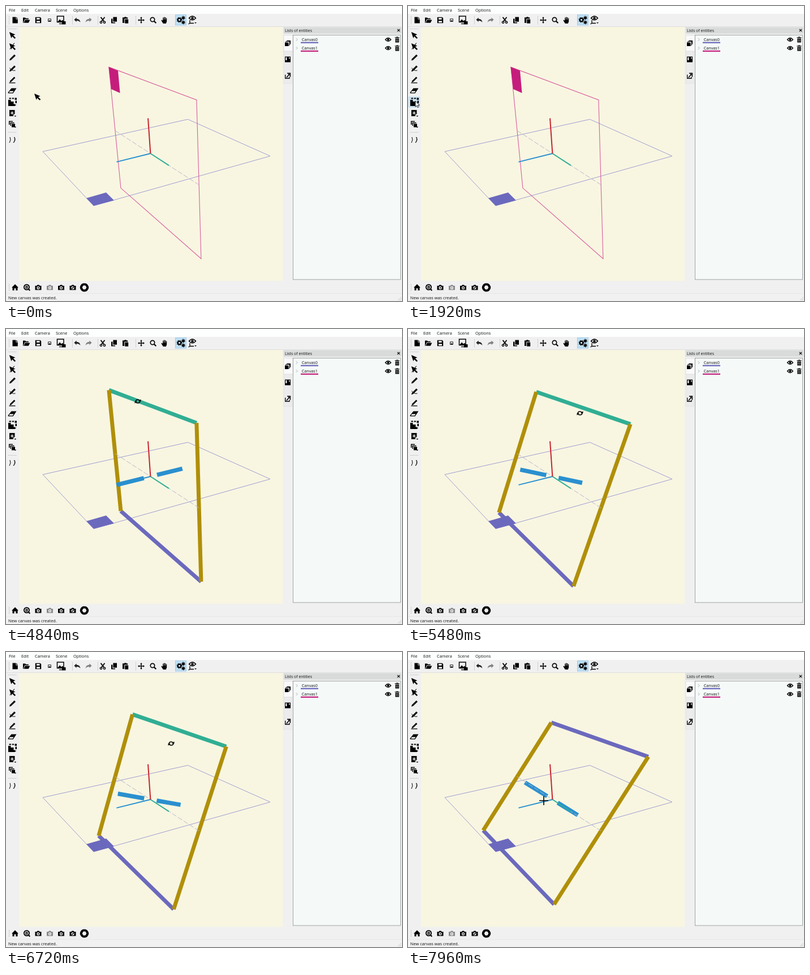
Write an HTML page that moves like this. It is 700 px wide and 522 px high and loops after 8000 ms.

```html
<!DOCTYPE html>
<html lang="en">
<head>
<meta charset="utf-8">
<title>Canvas rotation</title>
<style>
  html, body { margin: 0; width: 100%; height: 100%; overflow: hidden; background: #f0f0f0; }
  svg { display: block; width: 700px; height: 522px; }
  text { font: 7.4px "Open Sans", "Noto Sans", sans-serif; fill: #111; }
  .line { fill: none; stroke: #000; stroke-width: 1.3; }
</style>
</head>
<body>
<svg id="stage" viewBox="0 0 700 522" xmlns="http://www.w3.org/2000/svg">
  <g id="ui"></g>
  <g id="scene"></g>
  <g id="pointer"></g>
</svg>
<script>
const LOOP = 8000;
const C = { purple: '#6b69bd', pink: '#c51d7c', gold: '#b08f08', teal: '#30ae94', blue: '#2a90cf', paper: '#f8f6e1' };
const $ = id => document.getElementById(id);
const rect = (x, y, w, h, fill, more = '') => `<rect x="${x}" y="${y}" width="${w}" height="${h}" fill="${fill}" ${more}/>`;
const text = (x, y, s, size = 7.4) => `<text x="${x}" y="${y}" style="font-size:${size}px">${s}</text>`;
const fill = (d, c = '#000') => `<path d="${d}" fill="${c}" fill-rule="evenodd"/>`;
const line = (d, w = 1.3, c = '#000') => `<path class="line" d="${d}" style="stroke:${c};stroke-width:${w}"/>`;
const at = (x, y, s) => `<g transform="translate(${x} ${y})">${s}</g>`;
const ring = (r, w, c) => `<circle r="${r}" fill="none" stroke="${c || '#000'}" stroke-width="${w}"/>`;
const dot = (x, y, r, c = '#000') => `<circle cx="${x}" cy="${y}" r="${r}" fill="${c}"/>`;

// ---- icons, centred on 0,0 ----
const arrow = fill('M0 0L10.6 4.4 7 6.1 11.3 10.3 9.5 12 5.2 7.8 3.6 11Z');
const pen = fill('M-5.5 5.5L-4.6 2.6 3.3-5.3 5.5-3.1-2.6 4.8Z');
const eye = line('M-5 0Q0-6 5 0Q0 6-5 0Z', 1.3) + dot(0, 0, 2);
const bin = fill('M-4-4.2H-1.5V-5H1.5V-4.2H4V-3H-4ZM-3.3-2H3.3V5H-3.3ZM-1.8-.8V3.8H-1V-.8ZM1-.8V3.8H1.8V-.8Z');
const camera = c => fill('M-5.5-3H-2.6L-1.6-4.6H1.6L2.6-3H5.5V4.5H-5.5Z', c) + dot(0, .7, 2.6, '#f0f0f0');
const more = fill('M3.4 4.6H7.4L5.4 6.6Z');
const undo = c => fill('M-5.6-.8L-1.4-4.6V-2.2Q4.5-2.4 5.5 4Q3 .8-1.4 1V3.2Z', c);
const stack = fill('M-1.5-5H5V1.5H3.5V-3.5H-1.5ZM-5-1.5H1.5V5H-5Z') + line('M-3.2-1.5V-3.3H3.3V3.2H1.5', 1);
const gear = (r, n) => ring(r, 2) +
  `<circle r="${r + 1.4}" fill="none" stroke="#000" stroke-width="1.6" stroke-dasharray="${(r + 1.4) * Math.PI / n}"/>`;
const frame = line('M-6-6H6V6H-6Z', 1.2);
const aperture = () => {
  let s = '';
  for (let a = 0; a < 360; a += 60) s += `<path d="M-2.4-3.4L1.8-7.6Q6.4-6.2 7.2-1.6L1.4-3.4Z" transform="rotate(${a})"/>`;
  return s;
};

function drawUi() {
  let s = rect(0, 0, 700, 522, '#f0f0f0') + rect(0, 0, 700, 14, '#fdfefe');
  [['File', 5], ['Edit', 27], ['Camera', 51], ['Scene', 88], ['Options', 119]].forEach(([n, x]) => s += text(x, 9.8, n));
  s += rect(0, 36, 700, .7, '#d8d8d8') + rect(23, 37, 466, 449.5, C.paper);
  const grip = (x, y, n, dx, dy) => {
    for (let i = 0; i < n; i++) s += rect(x + i * dx, y + i * dy, 1, 1, '#aaa');
  };
  [5, 117, 162, 229, 299].forEach(x => grip(x, 18, 7, 0, 2.2));
  grip(4, 40, 7, 2.2, 0);
  grip(4, 223, 7, 2.2, 0);
  grip(5, 492, 6, 0, 2.2);

  s += rect(299.5, 15.5, 19, 18.5, '#bfdff3', 'stroke="#8fc4e8" stroke-width=".7"');
  const put = (x, y, ...parts) => s += at(x, y, parts.join(''));
  // top row
  put(16, 25, fill('M-4.5-5.5H1.5V-1.5H4.8V5.5H-4.5ZM2.3-5.5L4.8-2.6H2.3Z'));
  put(36, 25, fill('M-6-4.5H-2L-1-3.2H3.8V-1.5H-3L-5 3.4V4.8H-6ZM-2.4-.6H6.4L3.8 4.8H-4.6Z'));
  put(57, 25, fill('M-5.2-5.2H3.5L5.2-3.5V5.2H-5.2ZM-3-4V-1H2.6V-4ZM-3 1.2V4.2H3V1.2Z'));
  put(77, 25, line('M-2.4-2.2H2.4V2.4H-2.4Z', .9), fill('M-2 2L0 0 2.2 2Z'));
  put(97, 24.5, line('M-6.5-6.5H5V4H-6.5Z', 1.5), fill('M-6 4L-2-1 1 2 3 0 5 3V4Z'), fill('M2 2.5H8.5V8H2Z'), line('M-3 7H3', 1.3));
  put(126, 25, undo('#222'));
  put(146, 25, `<g transform="scale(-1 1)">${undo('#808080')}</g>`);
  put(171, 25, line('M-3.5-5.2L2.3 2.4M3.5-5.2L-2.3 2.4', 1.8), `<g transform="translate(-3 3.8)">${ring(1.7, 1.4)}</g><g transform="translate(3 3.8)">${ring(1.7, 1.4)}</g>`);
  put(191, 25, fill('M-1.6-5.5H5V2.7H-1.6ZM-5-2.6H-2.6V3.9H2V5.6H-5Z'));
  put(211, 25, fill('M-5-4.8H-2L-1.2-5.8H1.2L2-4.8H4.2V-2.4H-1.7V5H-5ZM-.7-1.4H5.2V5.8H-.7Z'));
  put(239, 25, line('M-4.5 0H4.5M0-4.5V4.5', 1.4), fill('M-6 0L-3.6-1.9V1.9ZM6 0L3.6-1.9V1.9ZM0-6L-1.9-3.6H1.9ZM0 6L-1.9 3.6H1.9Z'));
  put(259, 24, ring(3.7, 1.7), line('M2.7 2.7L6.3 6.3', 2.2));
  put(280, 25, fill('M-2.2 6L-5.6.6-4.6-.4-2.8 1V-4.4H-1.5V-1H-.9V-5.6H.4V-1H1V-5H2.3V-.7H2.9V-3.6H4.2V2.4L2.8 6Z'));
  put(306.5, 24.5, gear(2.7, 8));
  put(313.4, 21, gear(1.2, 6));
  put(313.4, 29, gear(1.2, 6));
  put(329.5, 22, line('M-6-.5Q0-7.5 6-.5Q0 6-6-.5Z', 1.4), dot(0, -.5, 2.2), line('M-4.5 3V8.5H2.5M-4.5 8.5L-7 10', 1.3), fill('M3.5 7H7.5L5.5 9Z'));
  // left column
  put(5.8, 46, arrow);
  put(5.8, 66, arrow, line('M1 10.5L9-.5', 1.1));
  put(11.5, 91, pen);
  put(11.5, 110.5, pen, line('M-5-1Q-1 5 5 3.5', 1));
  put(11.5, 130, `<g transform="scale(.9)">${pen}</g>`, line('M-6 6H5', 1.3));
  put(11, 150, fill('M-7.5 3L-1.5-4.5H7.5L1.5 4.5H-7ZM-6 3.2H.8L2.6.6H-4Z'));
  s += '<rect id="hover" x="1.5" y="161" width="19" height="18" fill="#cfe6f5" stroke="#9acaea" stroke-width=".6"/>';
  put(11, 170, fill('M-7-4H-2.5V-1H2.5V3.5H5V7H-7Z'), fill('M-5.5-7.5H-2V-5.5H-5.5ZM-.3-7.5H3V-5.5H-.3ZM4.5-7.5H8V-4H4.5ZM5.5-2.5H8V2H5.5Z'), more);
  put(11, 189.5, fill('M-5-5.5H4.5V2H2V5.5H-5ZM-1-3V-.8H-3V.6H-1V2.6H.5V.6H2.5V-.8H.5V-3Z'), more);
  put(11, 209, fill('M-6-5.5H1V-4H-4.5V1H-6ZM-3.5-3H3.5V-1.5H-2V3H-3.5ZM-1-.5H5V5.5H-1Z'), more);
  put(11, 237, line('M-5 5Q-1.5 0-4-5M2 5Q6 0 3.5-5', 1), line('M2.5 5Q7 0 4-5', .7));
  // bottom row
  put(16, 498, fill('M0-5.8L6 .2H4.5V5.2H1.4V1.4H-1.4V5.2H-4.5V.2H-6Z'));
  put(36.5, 497.5, ring(4.6, 1.8), line('M3.2 3.2L5.8 6', 2), dot(0, 0, 2.5), line('M-2 0H2', .8, '#fff'));
  put(57, 498, camera('#000'), fill('M-1.6.7L1-.9V2.3Z'));
  put(77.5, 498, camera('#8a8a8a'), fill('M1.6.7L-1-.9V2.3Z', '#8a8a8a'));
  put(97.5, 498, camera('#000'), dot(0, .7, 1.2));
  put(118, 498, camera('#000'), line('M-1.5 2.3L1.7-1', 1.5));
  put(138.5, 498, aperture());
  s += rect(0, 509, 700, 13, '#f1f1f1') + rect(0, 508.6, 700, .6, '#dedede') + text(4, 518.6, 'New canvas was created.');
  for (let i = 0; i < 3; i++) for (let j = 0; j <= i; j++) s += rect(693 + i * 2.2, 519.5 - j * 2.2, 1, 1, '#b0b0b0');

  // entity panel
  s += rect(490.5, 37.5, 208.5, 11.5, '#d9dbdb') + text(493, 46, 'Lists of entities', 6.9);
  s += at(694, 43, line('M-2.2-2.2L2.2 2.2M2.2-2.2L-2.2 2.2', 1.1));
  s += rect(491, 52, 16, 28, '#fafafa', 'stroke="#ccc" stroke-width=".5"') + rect(491, 80, 14, 57, '#ececec', 'stroke="#d6d6d6" stroke-width=".5"');
  s += rect(507.4, 51.4, 190, 432.6, '#f5faf9', 'stroke="#8b8f8f" stroke-width=".8"');
  put(498, 66, stack);
  put(498, 94.5, fill('M-5-5H5V5H-5ZM-3.8-3.8V1.5H-1.5V-3.8ZM2.2-3.8V-1H3.8V-3.8Z'));
  put(498, 123.5, line('M-4.3-2V4.5H3V2M-1-4.5H4.5V2', 1.3), fill('M-3 3L1.6-2.6 0-3.4H3.5V.5L2.5-1.2-1 3Z'));
  [[59.5, 'Canvas0', C.purple], [74.5, 'Canvas1', C.pink]].forEach(([y, name, c]) => {
    s += at(514, y, line('M-1.2-2.4L1.2 0-1.2 2.4', .8, '#999'));
    s += text(522.8, y + 2.7, name, 7.2) + rect(521, y + 4.2, 31, 2.2, c);
    put(675.5, y, eye);
    put(691.5, y, bin);
  });
  $('ui').innerHTML = s;
}

// ---- motion: monotone cubic through [time, value...] keys ----
function track(keys, t, col = 1) {
  const n = keys.length - 1;
  if (t <= keys[0][0]) return keys[0][col];
  if (t >= keys[n][0]) return keys[n][col];
  const i = keys.findIndex(k => k[0] > t) - 1;
  const slope = j => (keys[j + 1][col] - keys[j][col]) / (keys[j + 1][0] - keys[j][0]);
  const tangent = j => {
    if (j < 1 || j >= n) return 0;
    const a = slope(j - 1), b = slope(j);
    return a * b > 0 ? 2 * a * b / (a + b) : 0;
  };
  const h = keys[i + 1][0] - keys[i][0], u = (t - keys[i][0]) / h, v = 1 - u;
  return keys[i][col] * v * v * (1 + 2 * u) + keys[i + 1][col] * u * u * (3 - 2 * u)
    + h * u * v * (tangent(i) * v - tangent(i + 1) * u);
}
const PATH = [
  [120, 50, 155], [900, 35, 159], [1760, 13, 168], [2920, 13, 168], [3250, 150, 164], [3560, 294, 150],
  [3640, 292, 149], [3720, 284, 146], [3920, 233, 128], [5200, 233, 128], [5480, 304, 149], [5880, 346, 166],
  [6000, 348, 167], [6120, 348, 167], [6720, 292, 162], [6800, 291, 162], [7360, 326, 166], [7420, 326, 167],
  [7760, 216, 272], [7960, 240, 263]
];
const ANGLE = [[5200, 0], [5480, 24.2], [5880, 50], [6000, 51], [6120, 51], [6720, 22.4], [6800, 22], [7360, 41]];
const GIZMO = 2440, PRESS = 4840, RELEASE = 7400;

// Perspective camera: x along the blue axis, y along green, z up.
function project(x, y, z) {
  const w = 1 - .0627 * x - .1573 * y - .0591 * z;
  return [(255.4 - 132.2 * x + 32.1 * y - 23.53 * z) / w, (261 + 12.4 * x + 5.72 * y - 136.52 * z) / w];
}
const pts = list => list.map(p => p[0].toFixed(2) + ' ' + p[1].toFixed(2)).join('L');
const seg = (a, b, c, w, extra = '') => `<path d="M${pts([a, b])}" stroke="${c}" stroke-width="${w}" fill="none" ${extra}/>`;

function drawScene(t) {
  const a = track(ANGLE, t) * Math.PI / 180, sn = Math.sin(a), cs = Math.cos(a);
  const onCanvas = (y, z) => project(-sn * z, y, cs * z);
  const normal = d => project(cs * d, 0, sn * d);
  const [tl, tr, br, bl] = [[-1, 1], [1, 1], [1, -1], [-1, -1]].map(p => onCanvas(...p));
  const o = project(0, 0, 0);
  let s = `<path d="M65 257.5L321.5 200.5 467 265.5 155 353.5Z" fill="none" stroke="#a19cd1"/>`
    + fill('M142 340L177 330 191 344 155 353.5Z', C.purple);
  if (t < GIZMO) {
    s += `<path d="M${pts([tl, tr, br, bl])}Z" fill="none" stroke="#d85c9e" stroke-width="1.1"/>`
      + fill('M181.5 108L198 114.5 201.5 154 186 147Z', C.pink);
  } else {
    const top = t >= PRESS && t < RELEASE ? C.teal : C.purple;
    s += seg(bl, br, C.purple, 7) + seg(tl, tr, top, 7) + seg(tl, bl, C.gold, 7) + seg(tr, br, C.gold, 7)
      + seg(normal(.1), normal(.5), C.blue, 7.5) + seg(normal(-.1), normal(-.5), C.blue, 7.5);
  }
  s += seg(project(0, -1, 0), project(0, 1, 0), '#b9b6c9', 1, 'stroke-dasharray="9 3"')
    + seg(o, project(.5, 0, 0), C.blue, 2) + seg(o, project(0, .42, 0), C.teal, 2) + seg(o, project(0, 0, .5), '#c9242f', 2);
  $('scene').innerHTML = s;
}

const cross = line('M-8 0H8M0-8V8', 1.6);
const turn = line('M-4 .6Q-3.6-3 0-3Q2-3 3.2-1.4M4-.6Q3.6 3 0 3Q-2 3-3.2 1.4', 1.7) + fill('M1 0H5.4V-3.8ZM-1 0H-5.4V3.8Z');
const plain = '<path d="M0 0V10.5L2.5 8.3 4.1 11.6 5.8 10.8 4.2 7.6H7.4Z" fill="#fff" stroke="#000" stroke-width=".8"/>';

function drawPointer(t) {
  const x = track(PATH, t, 1), y = track(PATH, t, 2);
  const over = x < 22;
  const shape = over ? plain : t < GIZMO ? arrow : t >= PRESS && t < RELEASE ? turn : cross;
  $('pointer').innerHTML = at(x.toFixed(2), y.toFixed(2), shape);
  $('hover').style.display = over && y > 161 ? '' : 'none';
}

const start = performance.now();
function render(now) {
  const t = Math.floor(Math.max(0, now - start) % LOOP / 40) * 40;
  drawScene(t);
  drawPointer(t);
  requestAnimationFrame(render);
}
drawUi();
render(start);
</script>
</body>
</html>
```
